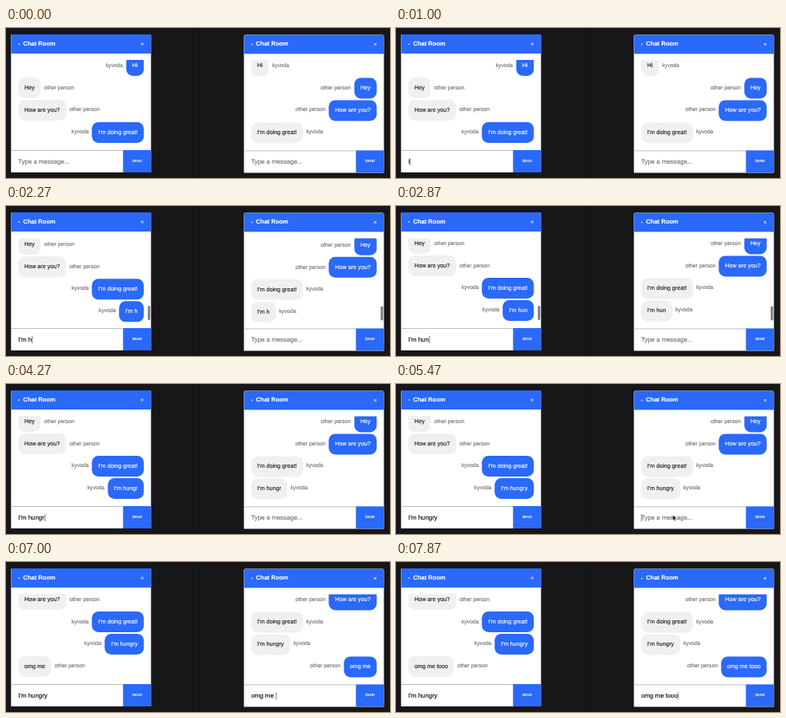
An HTML page that plays this animation: 480x188 px, repeating every 8 s.

```html
<!DOCTYPE html>
<html lang="en">
<head>
<meta charset="utf-8">
<title>Chat Room</title>
<style>
  html, body { margin: 0; width: 100%; height: 100%; overflow: hidden; background: #171619; }
  #stage {
    position: relative; width: 480px; height: 188px; overflow: hidden;
    font-family: "Liberation Sans", Arial, sans-serif;
    text-rendering: geometricPrecision;
    -webkit-text-stroke: .16px currentColor;
    --blue: #2a69f9;
  }
  #seam { position: absolute; left: 241px; top: 0; width: 1px; height: 188px; background: #131215; }
  .room {
    position: absolute; left: 0; top: 0; width: 175px; height: 172.6px;
    background: #fff; border-radius: 1.6px 1.6px 0 0; overflow: hidden;
  }
  .room header {
    height: 23.6px; background: var(--blue); color: #fff;
    font-size: 7.55px; font-weight: bold; line-height: 23.6px; padding-left: 15.2px;
  }
  .dot { position: absolute; left: 9.2px; top: 10.9px; width: 2px; height: 2px; border-radius: 50%; background: #a9e0dc; }
  .close { position: absolute; left: 161.6px; top: 9.7px; width: 4px; height: 4px; }
  .list { position: absolute; left: 0; top: 32px; width: 175px; height: 113px; overflow: hidden; }
  .column { position: absolute; left: 9.2px; right: 9.2px; bottom: 9.2px; }
  .row { display: flex; align-items: center; gap: 4.3px; height: 26.2px; margin-top: 1.6px; white-space: nowrap; }
  .row.mine { flex-direction: row-reverse; }
  .bubble {
    box-sizing: border-box; height: 26.2px; padding: 0 7.5px; border-radius: 8.2px;
    background: #f0f0f0; color: #222; font-size: 7.2px; line-height: 26.2px;
  }
  .mine .bubble { background: var(--blue); color: #fff; }
  .name { color: #777; font-size: 6.75px; }
  .thumb { position: absolute; left: 171.4px; top: 117.2px; width: 3px; height: 17.6px; border-radius: 1.5px; background: #7c7c7c; }
  .entry {
    position: absolute; left: 0; top: 145px; width: 140px; height: 28px;
    box-sizing: border-box; border-top: 1px solid #bdbdbd;
    padding-left: 9px; font-size: 7.87px; line-height: 27px; white-space: pre; color: #111;
  }
  .entry.empty { color: #757575; }
  .caret { position: absolute; top: 8.6px; width: 1px; height: 9.4px; background: #777; }
  .send {
    position: absolute; left: 140px; top: 145px; width: 35px; height: 28px;
    background: var(--blue); color: #fff; font-size: 4.4px; line-height: 28.6px; text-align: center;
  }
  #pointer { position: absolute; left: 0; top: 0; width: 5px; height: 8px; overflow: visible; }
</style>
</head>
<body>
<div id="stage"><div id="seam"></div></div>
<script>
const LOOP = 8000, PITCH = 27.8, BLINK = 530;
const stage = document.getElementById('stage');
const names = ['kyvoda', 'other person'];

// Each draft is typed one key at a time and mirrored live in both rooms.
const drafts = [
  { text: "I'm hungry", focus: 200, blur: 5400, shown: 2180,
    keys: [1000, 1270, 1530, 1870, 2190, 2470, 2730, 3000, 4130, 4400] },
  { text: 'omg me tooo', focus: 5400, blur: LOOP, shown: 6040,
    keys: [5930, 6115, 6530, 6600, 6730, 6870, 6985, 7400, 7530, 7670, 7800] }
];
const messages = [
  { by: 0, text: 'Hi' },
  { by: 1, text: 'Hey' },
  { by: 1, text: 'How are you?' },
  { by: 0, text: "I'm doing great!" },
  { by: 0, draft: drafts[0] },
  { by: 1, draft: drafts[1] }
];
const scrolls = [[2180, 2380], [6040, 6240]];
const thumbs = [[2180, 3000], [6040, 6700]];
const pointerRuns = [
  [[70, 346, 160], [330, 42, 170.5], [1000, 42, 170.5]],
  [[4670, 42, 171], [4870, 97, 181], [5070, 110, 182], [5270, 240, 180], [5450, 346, 164.3], [5930, 346, 164.3]]
];

const clamp = v => Math.min(1, Math.max(0, v));
const ramp = (t, a, b) => clamp((t - a) / (b - a));

function add(parent, cls, text = '', tag = 'div') {
  const el = document.createElement(tag);
  el.className = cls;
  el.textContent = text;
  parent.append(el);
  return el;
}

function makeRoom(x, y, owner) {
  const room = add(stage, 'room');
  room.style.transform = `translate(${x}px, ${y}px)`;
  add(room, '', 'Chat Room', 'header');
  add(room, 'dot');
  room.insertAdjacentHTML('beforeend',
    '<svg class="close" viewBox="0 0 4 4"><path d="M.4.4 3.6 3.6M3.6.4.4 3.6" stroke="#fff" stroke-width=".9"/></svg>');
  const column = add(add(room, 'list'), 'column');
  const rows = messages.map(m => {
    const row = add(column, m.by === owner ? 'row mine' : 'row');
    const bubble = add(row, 'bubble', m.text);
    add(row, 'name', names[m.by]);
    return { row, bubble, draft: m.draft };
  });
  const thumb = add(room, 'thumb');
  const entry = add(room, 'entry');
  const label = add(entry, '', '', 'span');
  const caret = add(entry, 'caret');
  add(room, 'send', 'SEND');
  return { column, rows, thumb, entry, label, caret, draft: drafts[owner] };
}

const rooms = [makeRoom(6.3, 8, 0), makeRoom(297.4, 8.4, 1)];
stage.insertAdjacentHTML('beforeend',
  '<svg id="pointer" viewBox="0 0 5 8"><path d="M0 0V6.4L1.5 5.1 2.5 7.4 3.6 6.9 2.6 4.7H4.6Z" fill="#000" stroke="#fff" stroke-width=".5"/></svg>');
const pointer = document.getElementById('pointer');

const typed = (d, t) => d.text.slice(0, d.keys.filter(k => k <= t).length);

function caretOn(d, t) {
  if (t < d.focus || t >= d.blur) return false;
  const last = Math.max(d.focus, ...d.keys.filter(k => k <= t));
  return Math.floor((t - last) / BLINK) % 2 === 0;
}

function drawRoom(room, t) {
  for (const { row, bubble, draft } of room.rows) {
    if (!draft) continue;
    row.style.display = t >= draft.shown ? '' : 'none';
    bubble.textContent = typed(draft, t);
  }
  const run = scrolls.find(([a, b]) => t >= a && t < b);
  const offset = run ? (1 - ramp(t, ...run)) ** 5 * PITCH : 0;
  room.column.style.transform = `translateY(${offset}px)`;
  room.thumb.style.opacity = Math.max(...thumbs.map(([a, b]) => t < a ? 0 : 1 - ramp(t, b, b + 200)));

  const text = typed(room.draft, t);
  room.entry.classList.toggle('empty', !text);
  room.label.textContent = text || 'Type a message...';
  room.caret.style.visibility = caretOn(room.draft, t) ? 'visible' : 'hidden';
  const width = text ? room.label.getBoundingClientRect().width : 0;
  room.caret.style.left = 9 + width + 'px';
}

function drawPointer(t) {
  const run = pointerRuns.find(r => t >= r[0][0] && t < r[r.length - 1][0]);
  pointer.style.visibility = run ? 'visible' : 'hidden';
  if (!run) return;
  const i = run.findIndex(p => p[0] > t);
  const [t0, x0, y0] = run[i - 1], [t1, x1, y1] = run[i];
  const p = ramp(t, t0, t1);
  pointer.style.transform = `translate(${x0 + (x1 - x0) * p}px, ${y0 + (y1 - y0) * p}px)`;
}

const start = performance.now();
function frame() {
  const t = (performance.now() - start) % LOOP;
  rooms.forEach(room => drawRoom(room, t));
  drawPointer(t);
  requestAnimationFrame(frame);
}
frame();
</script>
</body>
</html>
```
